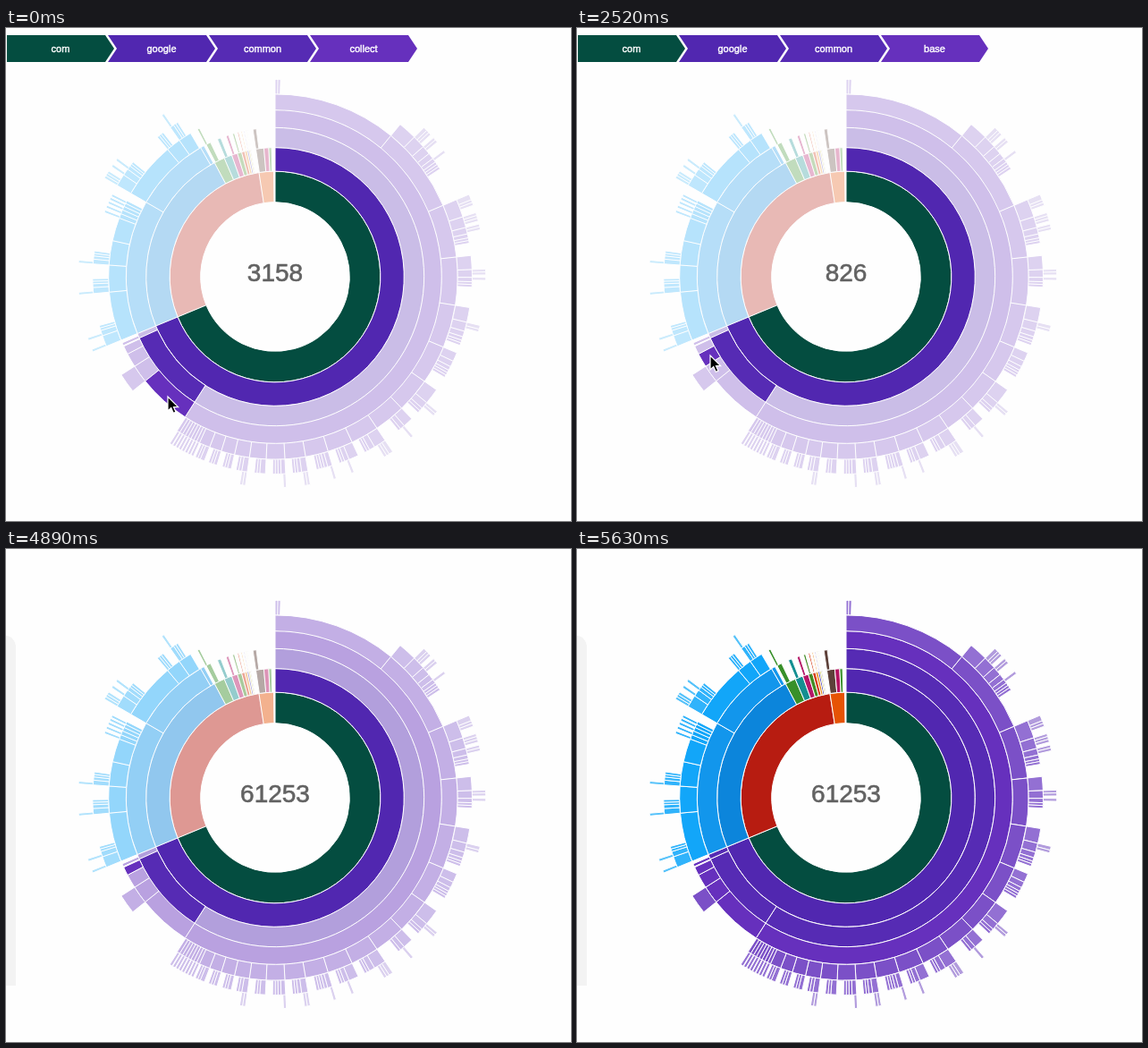
Recreate the animation shown at these times as an HTML page. Size 632 by 551 pixels, loop 6080 ms.

```html
<!DOCTYPE html>
<html lang="en">
<head>
<meta charset="utf-8">
<title>Package sunburst</title>
<style>
html, body { margin: 0; width: 100%; height: 100%; overflow: hidden; background: #fefefe; }
svg { display: block; width: 632px; height: 551px; }
text { font-family: Helvetica, Arial, "Liberation Sans", sans-serif; text-anchor: middle; }
#total { font-size: 28px; fill: #626262; stroke: #626262; stroke-width: .6px; }
#trail text { font-size: 11px; fill: #fff; stroke: #fff; stroke-width: .4px; }
#chart path { stroke: #fff; stroke-width: 1px; }
</style>
</head>
<body>
<svg viewBox="0 0 632 551">
  <path id="panel" d="M0 97C6 97 11 103 11 110V488H0Z" fill="#f3f3f3"/>
  <g id="trail" transform="translate(1 8)"></g>
  <g id="chart" transform="translate(301 278)"></g>
  <text id="total" x="301" y="283"></text>
  <path id="cursor" d="M0 0V16L3.7 12.6 6.3 18.4 9 17.2 6.5 11.6H11.6Z" fill="#000" stroke="#fff" stroke-width="1.2"/>
</svg>
<script>
const LOOP = 6080, STEP = 148, OUT = 3850, LEAVE = 4515, FADE = 1000, TOTAL = 61253;
const CX = 301, CY = 278;
const $ = id => document.getElementById(id);
const chart = $('chart'), trail = $('trail');

const green = '#044d40';
const purple = [, , '#5127b0', '#562bb4', '#6630bd', '#7b50c7', '#9370d3', '#b29cdd', '#cdbfea'];
const blue = [, , '#0c85db', '#1296ec', '#12a6f9', '#30b3fb', '#55c2fa', '#86d3fa', '#b3e5fc'];
const mix = ['#38902a', '#148f91', '#b51868', '#438c25', '#d63c18', '#e68a16', '#4d3fb0', '#c1bd1f', '#9b8f80'];

let seed = 11;
const random = () => (seed = seed * 16807 % 2147483647) / 2147483647;

function add(parent, tag, attrs) {
  const el = document.createElementNS('http://www.w3.org/2000/svg', tag);
  for (const key in attrs) el.setAttribute(key, attrs[key]);
  return parent.appendChild(el);
}

// Rings of equal area; angles run clockwise from the top, in degrees.
const radius = depth => 250 * Math.sqrt(depth / 9);
const point = (r, deg) => {
  const a = deg * Math.PI / 180;
  return (r * Math.sin(a)).toFixed(2) + ' ' + (-r * Math.cos(a)).toFixed(2);
};
function arc(depth, from, to, fill) {
  const r = radius(depth), R = radius(depth + 1), big = +(to - from > 180);
  return add(chart, 'path', {
    fill,
    d: `M${point(r, from)}A${r} ${r} 0 ${big} 1 ${point(r, to)}L${point(R, to)}A${R} ${R} 0 ${big} 0 ${point(R, from)}Z`
  });
}

// Start angles of n neighbours, each q times as wide as the one before.
function shrink(from, width, q, n) {
  const stops = [from];
  for (let i = 0; i < n; i++) stops.push(stops[i] + width * q ** i);
  return stops;
}
// Calls fn with the start, end and index of each neighbour.
const pairs = (stops, fn) => stops.slice(1).forEach((to, i) => fn(stops[i], to, i));

// Children fill the first part of their parent, largest first.
function sprout(depth, from, to, fill, shades) {
  const end = from + (to - from) * (fill + .3 * (random() - .5));
  const share = .3 + .25 * random();
  for (let a = from; a < end - .4;) {
    const w = Math.max(.8, (end - a) * share);
    arc(depth, a, a + w, shades[depth]);
    if (depth < 8 && w > 1.2 && random() < 2.5 - .3 * depth) sprout(depth + 1, a, a + w, fill, shades);
    a += w;
  }
}

const com = arc(1, 0, 247.6, green);
arc(1, 247.6, 351.2, '#b71c11');
arc(1, 351.2, 359.3, '#e65305');

const google = arc(2, 0, 247.6, purple[2]);
arc(3, 0, 212.7, purple[3]);
arc(4, 0, 212.7, purple[4]);
const common = arc(3, 212.7, 245.7, purple[3]);
arc(3, 245.7, 247.6, purple[3]);

let angle = 212.7;
const sizes = { collect: 3158, util: 1063, base: 826, primitives: 507 };
const leaves = Object.entries(sizes).map(([name, count]) => {
  const from = angle;
  angle += count / TOTAL * 360;
  return { name, count, from, to: angle, path: arc(4, from, angle, purple[4]) };
});
arc(4, angle + .3, angle + 1.3, purple[4]);
arc(5, leaves[1].from, leaves[1].to, purple[5]);

sprout(6, 0, 3, .75, purple);
pairs([0, 39.4, 67, ...shrink(83.8, 15.2, .9, 15), ...shrink(205.5, 1, 1, 7)], (from, to, i) => {
  arc(5, from, to, purple[5]);
  if (i) sprout(6, from, to, .7, purple);
});

arc(2, 247.6, 332, blue[2]);
pairs([247.6, 300, 330, 331.5], (from, to) => arc(3, from, to, blue[3]));
for (const stops of [[247.6, 264.7, 274, 282.5], shrink(290.6, 1.6, .9, 5), [300, 319.8, 324.9, 329.5]]) {
  pairs(stops, (from, to) => {
    arc(4, from, to, blue[4]);
    sprout(5, from, to, .45, blue);
  });
}
arc(4, 282.5, 290.6, blue[4]);

// Small packages at the top left.
pairs(shrink(332, 4.8, .74, 9), (from, to, i) => {
  arc(2, from, to, mix[i]);
  arc(3, from + .4, from + .4 + (to - from) * .4, mix[i]);
});
pairs(shrink(351.4, 3.6, .6, 3), (from, to, i) => arc(2, from, to, ['#5d4039', '#b51360', mix[0]][i]));
arc(3, 351.4, 352.8, '#5d4039');
arc(4, 332.2, 333, mix[0]);

const labels = ['com', 'google', 'common', ''].map((name, i) => {
  const g = add(trail, 'g', { transform: `translate(${i * 113} 0)` });
  add(g, 'polygon', {
    points: '0,0 110,0 120,15 110,30 0,30' + (i ? ' 10,15' : ''),
    fill: [green, purple[2], purple[3], purple[4]][i]
  });
  const label = add(g, 'text', { x: 60, y: 19 });
  label.textContent = name;
  return label;
});

const clamp = t => Math.min(1, Math.max(0, t));
const ease = t => t < .5 ? 4 * t ** 3 : 1 - 4 * (1 - t) ** 3;

// Pointer moves: start, end, x, y.
const moves = [[740, 1640, 160, 381], [1850, 2530, 149, 366], [2890, 3415, 144, 356], [OUT, 4650, 52, 476]];
function pointer(t) {
  let x = 181, y = 412;
  for (const [start, end, toX, toY] of moves) {
    const p = ease(clamp((t - start) / (end - start)));
    x += (toX - x) * p;
    y += (toY - y) * p;
  }
  return [x, y];
}
function hovered(t) {
  const [x, y] = pointer(Math.min(t, OUT));
  const deg = (Math.atan2(x - CX, CY - y) * 180 / Math.PI + 360) % 360;
  return leaves.find(leaf => deg < leaf.to);
}

const paths = [...chart.children];
const show = (el, on) => { el.style.display = on ? '' : 'none'; };

function draw(t) {
  const leaf = hovered(t), left = t > LEAVE, gone = t > LEAVE + STEP;
  const dim = .3 + .7 * ease(clamp((t - LEAVE) / FADE));
  const lit = [com, google, common, leaf.path];
  for (const p of paths) p.style.opacity = lit.includes(p) ? 1 : dim;
  labels[3].textContent = leaf.name;
  $('total').textContent = left ? TOTAL : leaf.count;
  $('cursor').setAttribute('transform', `translate(${pointer(t).map(Math.round)})`);
  show(trail, !left);
  show($('cursor'), !gone);
  show($('panel'), gone);
}

let last = -1;
function tick() {
  const k = Math.min(40, Math.floor(performance.now() % LOOP / STEP));
  if (k !== last) draw((last = k) * STEP + 6);
  requestAnimationFrame(tick);
}
tick();
</script>
</body>
</html>
```
